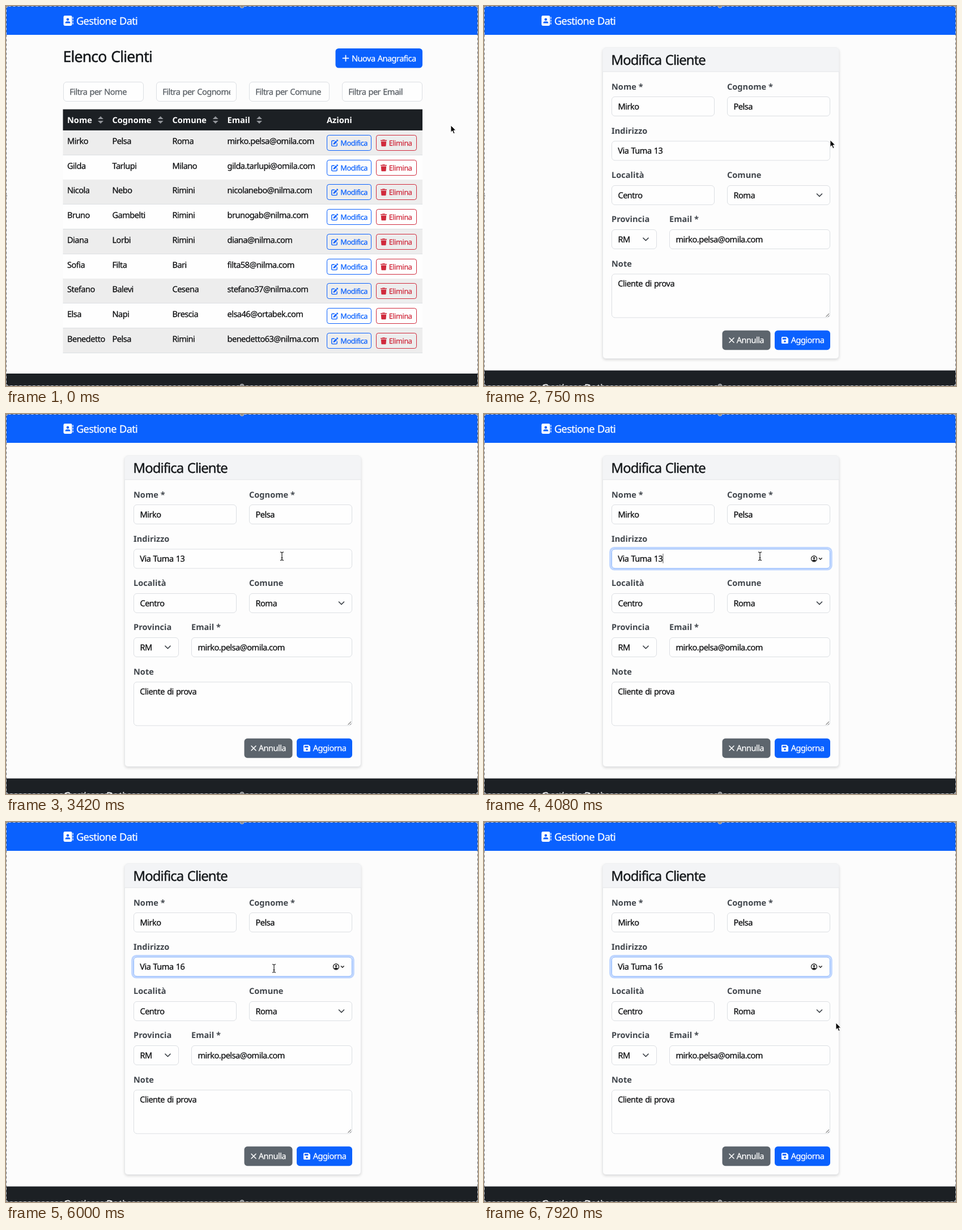
An HTML page that plays this animation: 833x672 px, repeating every 8000 ms.

```html
<!DOCTYPE html>
<html lang="it">
<head>
<meta charset="utf-8">
<title>Gestione Dati</title>
<style>
  html, body { margin: 0; width: 100%; height: 100%; overflow: hidden; background: #fcfcfc; }
  svg { display: block; }
  text {
    font: 14.6px "Noto Sans", "Open Sans", sans-serif;
    letter-spacing: -.037em; word-spacing: .06em;
    color: #0c0d0f; fill: currentColor; stroke: currentColor; stroke-width: .25px;
    text-rendering: geometricPrecision; white-space: pre;
  }
  .brand { font-size: 18.26px; color: #fff; }
  .h2 { font-size: 26.7px; color: #15181b; letter-spacing: -.032em; stroke-width: .45px; }
  .h4 { font-size: 23.9px; color: #15181b; letter-spacing: -.04em; stroke-width: .4px; }
  .th, .label { font-weight: 700; letter-spacing: 0; word-spacing: 0; stroke: none; }
  .th, .white { color: #fff; }
  .label { color: #41464c; }
  .hint { color: #575d63; }
  .small { font-size: 12.8px; color: inherit; }
  .field { fill: #fefefe; stroke: #dcdfe3; }
  .line { fill: none; stroke: currentColor; stroke-linecap: round; stroke-linejoin: round; }
  .solid { fill: currentColor; }
  .edit { --c: #0a61fe; }
  .del { --c: #d02a3c; }
  .btn { color: var(--c); }
  .btn rect { fill: none; stroke: var(--c); }
  .btn.on { color: #fff; }
  .btn.on rect { fill: var(--c); }
</style>
</head>
<body>
<svg id="stage" width="833" height="672" viewBox="0 0 833 672"></svg>
<script>
const BLUE = '#0a61fe', DARK = '#1c2024';
const LOOP = 8000, FPS = 12;

const text = (x, y, s, cls = '', id = '') => `<text x="${x}" y="${y}" class="${cls}" id="${id}">${s}</text>`;
const box = (x, y, w, h, r, attrs) => `<rect x="${x}" y="${y}" width="${w}" height="${h}" rx="${r}" ${attrs}/>`;
const line = (d, w = 1.5) => `<path class="line" d="${d}" stroke-width="${w}"/>`;
const at = (x, y, body, attrs = '') => `<g transform="translate(${x} ${y})" ${attrs}>${body}</g>`;
const field = (x, y, w, h = 34) => box(x + .5, y + .5, w - 1, h, 5.5, 'class="field"');
const chevron = (x, y) => at(x, y, line('M-4.5-2.3 0 2.2 4.5-2.3', 1.6), 'color="#343a40"');

// Icons
const pen = line('M5.5 2H2.2Q.8 2 .8 3.4V10Q.8 11.4 2.2 11.4H8.8Q10.2 11.4 10.2 10V7', 1.4) +
  '<path class="solid" d="M4 6.2 8.3 1.9 10.4 4 6.1 8.3 3.4 8.9ZM9 1.2 9.8.4Q10.6-.2 11.4.5L11.9 1Q12.5 1.8 11.9 2.5L11.1 3.3Z"/>';
const trash = '<path class="solid" d="M0 .9H3L3.6 0H7.4L8 .9H11V2.4H0ZM.8 3.2H10.2L9.6 11Q9.5 12 8.5 12H2.5Q1.5 12 1.4 11Z"/>';
const sorter = '<path fill="#92959a" d="M-5-1.6 0-6.6 5-1.6ZM-5 1.6 0 6.6 5 1.6Z"/>';
const book = box(0, 0, 15, 18, 2.4, 'fill="#fff"') +
  `<circle cx="7.5" cy="6.7" r="2.3" fill="${BLUE}"/><path fill="${BLUE}" d="M3 13.5Q3 10.3 6 10.3H9Q12 10.3 12 13.5Z"/>` +
  '<path stroke="#fff" stroke-width="1.3" d="M16.7 2.5V5.7M16.7 7.4V10.6M16.7 12.3V15.5"/>';
const floppy = '<path fill="#fff" fill-rule="evenodd" d="M1.6 0H9L12 3V10.4Q12 12 10.4 12H1.6Q0 12 0 10.4V1.6Q0 0 1.6 0ZM1.8 1.8V4.8H8.4V1.8ZM6 6.4A1.8 1.8 0 1 0 6 10 1.8 1.8 0 1 0 6 6.4Z"/>';
const account = '<circle r="5" fill="none" stroke="#222" stroke-width="1.3"/><circle cy="-1.3" r="1.8" fill="#222"/>' +
  '<path fill="#222" d="M-3.6 3.2Q0-.6 3.6 3.2 0 6.2-3.6 3.2Z"/><path d="M8.5-1.5 11.3 1.3 14.1-1.5" fill="none" stroke="#222" stroke-width="1.5"/>';

const people = [
  ['Mirko', 'Pelsa', 'Roma', 'mirko.pelsa@omila.com'],
  ['Gilda', 'Tarlupi', 'Milano', 'gilda.tarlupi@omila.com'],
  ['Nicola', 'Nebo', 'Rimini', 'nicolanebo@nilma.com'],
  ['Bruno', 'Gambelti', 'Rimini', 'brunogab@nilma.com'],
  ['Diana', 'Lorbi', 'Rimini', 'diana@nilma.com'],
  ['Sofia', 'Filta', 'Bari', 'filta58@nilma.com'],
  ['Stefano', 'Balevi', 'Cesena', 'stefano37@nilma.com'],
  ['Elsa', 'Napi', 'Brescia', 'elsa46@ortabek.com'],
  ['Benedetto', 'Pelsa', 'Rimini', 'benedetto63@nilma.com']
];
const cols = [108, 187.5, 293.5, 390.5, 566];

function row(person, i) {
  const y = Math.round(220 + i * 43.72);
  const button = (kind, x, w, tx, icon, label) => `<g class="btn ${kind}">` +
    box(x + .5, y + 8.5, w - 1, 27, 3.7, '') + at(x + 8, y + 16.2, icon) + text(tx, y + 26.6, label, 'small') + '</g>';
  return `<g class="row">${box(100.5, y, 634.5, 44, 0, `fill="${i % 2 ? '#fefefe' : '#ededed'}"`)}
    <path d="M100.5 ${y + 43.5}H735" stroke="#dcdfe2"/>
    ${person.map((s, c) => text(cols[c], y + 24.2, s)).join('')}
    ${button('edit', 566, 79, 590.3, pen, 'Modifica')}${button('del', 653, 72, 675.8, trash, 'Elimina')}</g>`;
}

const list = `<g id="list">
  ${box(0, 650, 833, 22, 0, `fill="${DARK}"`)}
  ${text(100.5, 99, 'Elenco Clienti', 'h2')}
  ${box(581.5, 75, 153.5, 34.6, 5.5, `fill="${BLUE}"`)}
  ${at(599.5, 92.4, line('M-5 0H5M0-5V5', 1.7), 'color="#fff"')}
  ${text(610, 97.7, 'Nuova Anagrafica', 'white')}
  ${['Nome', 'Cognome', 'Comune', 'Email'].map((s, i) => {
    const x = 101 + i * 164;
    return field(x, 134, 142) + `<svg x="${x}" y="134" width="131" height="34">${text(11.3, 23.2, 'Filtra per ' + s, 'hint')}</svg>`;
  }).join('')}
  ${box(100.5, 182.7, 634.5, 37.3, 0, `fill="${DARK}"`)}
  ${['Nome', 'Cognome', 'Comune', 'Email', 'Azioni'].map((s, i) => text(cols[i], 206.8, s, 'th')).join('')}
  ${[167, 272.7, 369.7, 447].map(x => at(x, 201.5, sorter)).join('')}
  ${people.map(row).join('')}
</g>`;

const labels = [
  [225, 147.5, 'Nome *'], [429, 147.5, 'Cognome *'], [225, 225.8, 'Indirizzo'], [225, 304, 'Località'],
  [429, 304, 'Comune'], [225, 382.3, 'Provincia'], [327, 382.3, 'Email *'], [225, 460.6, 'Note']
];
const inputs = [
  [225, 160, 182, 'Mirko'], [429, 160, 182, 'Pelsa'], [225, 317, 182, 'Centro'], [429, 317, 182, 'Roma'],
  [225, 395, 80, 'RM'], [327, 395, 284, 'mirko.pelsa@omila.com']
];

const form = `<g id="form">
  ${box(0, 644.5, 833, 28, 0, `fill="${DARK}"`)}
  ${text(101, 682, 'Gestione Dati', 'brand')}
  ${box(209.5, 74, 417, 549.5, 5.5, 'fill="#fdfdfd" stroke="#e6e8ea" style="filter:drop-shadow(0 2px 2px #0002)"')}
  <path d="M209.5 116V79.5Q209.5 74 215 74H621Q626.5 74 626.5 79.5V116Z" fill="#f3f4f6"/>
  <path d="M209.5 116H626.5" stroke="#e2e4e7"/>
  ${text(224.5, 104, 'Modifica Cliente', 'h4')}
  ${labels.map(l => text(...l, 'label')).join('')}
  ${inputs.map(([x, y, w, s]) => field(x, y, w) + text(x + 11.5, y + 22.9, s)).join('')}
  ${chevron(592, 334.5)}${chevron(285.5, 412.5)}
  ${field(225, 238.5, 386)}
  <g id="focus">
    ${box(223, 236.7, 390, 38, 7, 'fill="none" stroke="#bfd6ff" stroke-width="3.6"')}
    ${box(225.5, 239, 385, 34, 5.5, 'fill="#fefefe" stroke="#86b4fe"')}
    ${at(582.5, 256, account)}
  </g>
  ${text(236.3, 261.3, '', '', 'street')}
  ${box(0, 247, 1.3, 17, 0, 'id="caret" fill="#000"')}
  ${field(225, 473.5, 386, 77)}${text(236.3, 496.4, 'Cliente di prova')}
  <path d="M603.5 549.5 609 544M607 549.5 609 547.5" stroke="#444"/>
  ${box(420.5, 573.8, 85, 34.4, 5.5, 'fill="#5d656d"')}
  ${at(437, 591, line('M-4-4 4 4M4-4-4 4', 1.6), 'color="#fff"')}${text(445.7, 596.3, 'Annulla', 'white')}
  ${box(513, 573.8, 98, 34.4, 5.5, `fill="${BLUE}"`)}
  ${at(525, 585, floppy)}${text(541.7, 596.3, 'Aggiorna', 'white')}
</g>`;

// Selection border with handles
const knob = (x, y, r) => `<circle cx="${x}" cy="${y}" r="${r}" fill="#8b8d90" stroke="#c9cbce" stroke-width=".8"/>`;
const frame = box(.5, .5, 832, 671, 0, 'fill="none" stroke="#d4d6d8"') +
  box(.5, .5, 832, 671, 0, 'fill="none" stroke="#606266" stroke-dasharray="4"') +
  knob(416.5, 0, 3.6) + knob(416.5, 672, 3.6) + knob(0, 335.5, 2) + knob(833, 335.5, 2) +
  [0, 833].map(x => knob(x, 0, 3) + knob(x, 672, 3)).join('');

const pointer = `<g id="pointer">
  <path id="arrow" fill="#000" stroke="#fff" stroke-width="1" d="M0 0V12.4L2.8 9.8 4.9 14.9 7.1 14 5 9H8.9Z"/>
  <path id="hand" fill="#fff" stroke="#000" stroke-width="1" d="M-1.2 7V.8A1.2 1.2 0 0 1 1.2.8V5q1.8-.8 2.3.5q1.8-.6 2.2.7q1.8-.3 1.9 1.2V10q0 1.7-1 3V14.5H-1V13.2Q-3 11.5-4.8 8.6q-.4-1.6 1.2-1.5Q-2.4 7.4-1.2 9Z"/>
  <path id="beam" fill="none" stroke="#222" stroke-width="1.2" d="M-3-7.3Q-.5-7.3 0-5.8 .5-7.3 3-7.3M0-5.8V5.8M-3 7.3Q-.5 7.3 0 5.8 .5 7.3 3 7.3M-1.5 2.8H1.5"/>
</g>`;

const stage = document.getElementById('stage');
stage.innerHTML = box(0, 0, 833, 51, 0, `fill="${BLUE}"`) + at(101.5, 17, book) +
  text(124, 32.8, 'Gestione Dati', 'brand') + list + form + frame + pointer;

const $ = id => document.getElementById(id);
const show = (el, on) => { el.style.display = on ? '' : 'none'; };
const clamp = v => Math.min(1, Math.max(0, v));
const firstRow = stage.querySelector('.row');
const [editBtn, delBtn] = firstRow.querySelectorAll('.btn');

// Pointer path: step, x, y
const path = [
  [0, 785, 211], [8, 611, 237], [17, 610, 237], [27, 487, 251.5], [69, 487, 251.5], [70, 473, 255],
  [75, 473, 266], [77, 473, 266], [81, 472, 319], [85, 472, 329], [90, 472, 329], [95, 621, 355]
];

function pointerAt(n) {
  const i = Math.max(1, path.findIndex(k => k[0] >= n));
  const [a, ax, ay] = path[i - 1], [b, bx, by] = path[i];
  const p = clamp((n - a) / (b - a)), e = p * p * (3 - 2 * p);
  return [ax + (bx - ax) * e, ay + (by - ay) * e];
}

function caretAlpha(n) {
  if (n < 44) return 0;
  if (n < 54) return n < 49 ? 1 : n < 51 ? .5 : 0;
  if (n < 61) return 1;
  const k = (n - 61) % 12;
  return k < 6 ? 1 : k === 6 ? .4 : 0;
}

function render(n) {
  const onList = n < 9;
  show($('list'), onList);
  show($('form'), !onList);

  const [x, y] = pointerAt(n);
  const inside = (l, t, r, b) => x >= l && x <= r && y >= t && y <= b;
  const overEdit = inside(566, 228, 645, 256), overDel = inside(653, 228, 725, 256);
  editBtn.classList.toggle('on', overEdit);
  delBtn.classList.toggle('on', overDel);
  firstRow.firstChild.setAttribute('fill', inside(101, 220, 735, 263) ? '#e6e6e6' : '#ededed');

  const shape = onList ? (overEdit || overDel ? 'hand' : 'arrow') : inside(225, 239, 611, 273) ? 'beam' : 'arrow';
  // the arrow stays until the pointer moves over the form
  const cursor = n < 18 && !onList ? 'arrow' : shape;
  for (const id of ['arrow', 'hand', 'beam']) show($(id), id === cursor);
  show($('pointer'), n < 54 || n >= 70);
  $('pointer').setAttribute('transform', `translate(${x} ${y})`);

  $('focus').style.opacity = clamp((n - 43) / 3);
  const street = $('street');
  street.textContent = 'Via Tuma 1' + (n < 54 ? '3' : n < 60 ? '' : '6');
  const alpha = caretAlpha(n);
  $('caret').style.opacity = alpha;
  if (alpha) $('caret').setAttribute('x', 236.3 + street.getComputedTextLength());
}

const start = performance.now();
function tick() {
  const t = (performance.now() - start) % LOOP;
  // small lead so that rounded step times land on their own step
  render(Math.floor((t + 4) * FPS / 1000) % (LOOP * FPS / 1000));
  requestAnimationFrame(tick);
}
tick();
</script>
</body>
</html>
```
